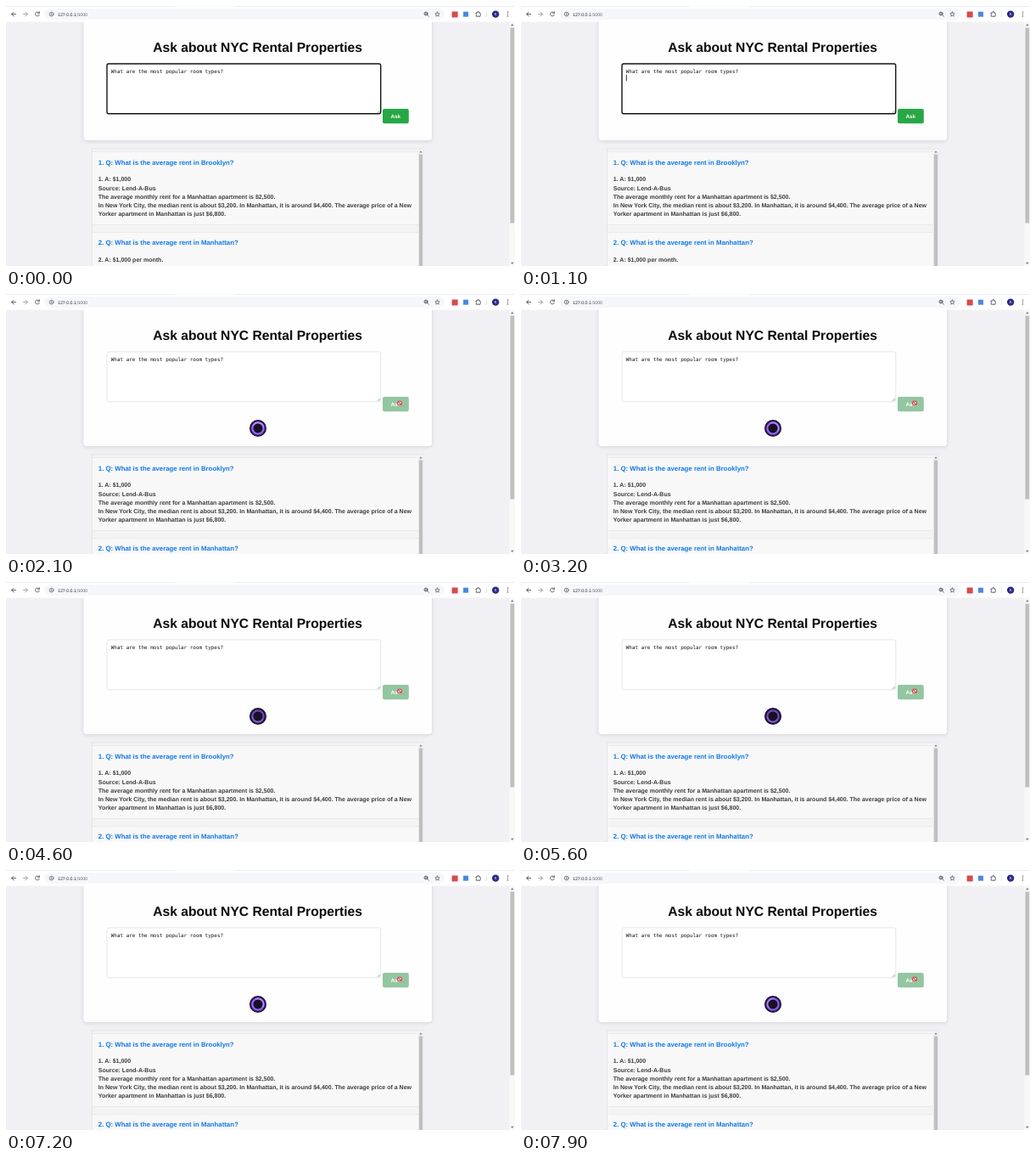
An HTML page that plays this animation: 600x306 px, repeating every 8 s.

```html
<!DOCTYPE html>
<html lang="en">
<head>
<meta charset="utf-8">
<title>Rental questions</title>
<style>
  html, body { margin: 0; width: 100%; height: 100%; overflow: hidden; background: #f1f0f5; }
  svg { display: block; width: 600px; height: 306px; }
  text { font-family: "Liberation Sans", Arial, sans-serif; text-rendering: geometricPrecision; white-space: pre; }
  .title { font-size: 15.65px; font-weight: 700; fill: #0a0a0a; text-anchor: middle; }
  .question { font-size: 7.82px; font-weight: 700; fill: #0f78e6; }
  .answer { font-size: 7.02px; font-weight: 700; fill: #3c3c3c; }
  .typed { font-family: "DejaVu Sans Mono", monospace; font-size: 5.95px; fill: #111; }
  .ask { font-size: 6.3px; font-weight: 700; fill: #fff; text-anchor: middle; }
  .url { font-size: 5.25px; fill: #26282c; }
  .icon { fill: none; stroke: #4a4d52; stroke-width: .9; stroke-linecap: round; stroke-linejoin: round; }
  .card { fill: #fefefe; filter: drop-shadow(0 1px 2.5px rgba(0, 0, 0, .12)); }
</style>
</head>
<body>
<svg viewBox="0 0 600 306">
  <rect width="600" height="306" fill="#f1f0f5"/>

  <rect id="card" class="card" x="91.5" y="14" width="410.5" height="144" rx="4"/>
  <text class="title" x="296.6" y="53.7">Ask about NYC Rental Properties</text>
  <rect id="field" x="119" y="68" width="322.7" height="58.8" rx="2" fill="#fff"/>
  <path d="M437.8 125.8L440.7 122.9M439.5 125.8L440.7 124.6" stroke="#777" stroke-width=".6"/>
  <text class="typed" x="123.8" y="78.8">What are the most popular room types?</text>
  <rect id="caret" width=".9" height="7.4" fill="#111"/>
  <rect id="button" x="444" y="121" width="30.8" height="17.2" rx="2"/>
  <text class="ask" x="459.3" y="131.8">Ask</text>

  <g id="panel">
    <rect x="101.4" y="168" width="390.4" height="150" fill="#f4f4f5" stroke="#dedee2" stroke-width=".7"/>
    <g fill="#f8f8f9" stroke="#e4e4e7" stroke-width=".7">
      <rect x="101.7" y="171.5" width="384.6" height="86"/>
      <rect x="101.7" y="266.3" width="384.6" height="60"/>
    </g>
    <g id="answers"></g>
    <rect x="486.3" y="168.4" width="5.3" height="150" fill="#f3f3f3"/>
    <path d="M487.3 172.6L489 170.5L490.7 172.6Z" fill="#777"/>
    <rect x="486.8" y="174.5" width="4.3" height="140" fill="#bfbfc1"/>
  </g>

  <g id="spinner" transform="translate(297 158)" fill="none">
    <circle r="10" fill="#130a22"/>
    <circle id="glow" r="7" stroke="#5a35a8" stroke-width="3.6"/>
    <circle id="ring" r="6.6" stroke="#9a6ff0" stroke-width="1.8"/>
    <path id="arc" d="M-6.6 0A6.6 6.6 0 0 1 4.7 -4.7" stroke="#c3a8ff" stroke-width="1.4" stroke-linecap="round"/>
    <circle r="4.6" fill="#171126"/>
  </g>

  <rect x="593.4" y="19" width="6.6" height="287" fill="#f8f8f9"/>
  <path d="M595 23.3L596.8 21L598.6 23.3ZM595 301.7L596.8 304L598.6 301.7Z" fill="#777"/>
  <rect id="thumb" x="594.4" y="25.5" width="4.8" height="230" fill="#bfbfc2"/>

  <rect width="600" height="18.6" fill="#fff"/>
  <rect width="600" height=".8" fill="#dfe8f8"/>
  <rect x="198" width="71" height=".8" fill="#fff"/>
  <rect x="45.5" y="3" width="472" height="13" rx="6.5" fill="#f6f7fb"/>
  <g class="icon">
    <path d="M11.5 9.6H6.7M8.9 7.3L6.6 9.6L8.9 11.9"/>
    <path d="M20.5 9.6H25.3M23.1 7.3L25.4 9.6L23.1 11.9" stroke="#999"/>
    <path d="M39 8.2A2.4 2.4 0 1 0 39.2 10.4M39.3 6.8V8.4H37.7"/>
    <circle cx="53.6" cy="9.6" r="2.4" stroke-width=".7"/>
    <path d="M53.6 9.4V10.8M53.6 8.3V8.4" stroke-width=".7"/>
    <circle cx="495" cy="9" r="2"/>
    <path d="M496.5 10.5L498.2 12.2M494.2 9H495.8"/>
    <path d="M508.5 6.9L509.3 8.7L511.2 8.9L509.8 10.2L510.2 12.1L508.5 11.1L506.8 12.1L507.2 10.2L505.8 8.9L507.7 8.7Z" stroke-width=".7"/>
    <path d="M554.3 8H556V7.3A.8 .8 0 0 1 557.6 7.3V8H559V9.3A1 1 0 0 1 559 11.1V12.2H554.3V11A.9 .9 0 0 0 554.3 9.4Z"/>
  </g>
  <rect x="525.6" y="6.5" width="7" height="7" fill="#d84a4a"/>
  <rect x="539" y="6.7" width="6" height="6" fill="#4a88d8"/>
  <path d="M566.3 6V13" stroke="#d5dcec" stroke-width=".7"/>
  <circle cx="577.1" cy="9.6" r="4.2" fill="#2b2a85"/>
  <text x="577.1" y="11.2" font-size="4.4" fill="#fff" text-anchor="middle">K</text>
  <g fill="#45484d">
    <circle cx="591.5" cy="7.3" r=".7"/><circle cx="591.5" cy="9.6" r=".7"/><circle cx="591.5" cy="11.9" r=".7"/>
  </g>
  <text class="url" x="61" y="11.5">127.0.0.1<tspan fill="#62666c">:5000</tspan></text>

  <path id="pointer" d="M0 0V8L1.9 6.3L3.1 9L4.4 8.4L3.2 5.8H5.7Z" fill="#fff" stroke="#111" stroke-width=".6"/>
  <g id="blocked" transform="translate(464 128.4)" fill="#fff" stroke="#d63a45" stroke-width="1.1">
    <circle r="2.4"/><path d="M-1.6 -1.6L1.6 1.6"/>
  </g>
</svg>
<script>
  const LOOP = 8000, STEP = 100, SENT = 2000, SHIFT = 21;
  const $ = id => document.getElementById(id);
  const set = (id, attrs) => {
    for (const key in attrs) $(id).setAttribute(key, attrs[key]);
  };
  const show = (id, on) => { $(id).style.display = on ? "" : "none"; };

  function addText(style, y, words) {
    const el = document.createElementNS("http://www.w3.org/2000/svg", "text");
    el.setAttribute("class", style);
    el.setAttribute("x", 108.8);
    el.setAttribute("y", y);
    el.textContent = words;
    $("answers").append(el);
  }

  function addItem(y, question, lines) {
    addText("question", y, question);
    lines.forEach((line, i) => addText("answer", y + 19.5 + i * 10.22, line));
  }

  addItem(186.9, "1. Q: What is the average rent in Brooklyn?", [
    "1. A: $1,000",
    "Source: Lend-A-Bus",
    "The average monthly rent for a Manhattan apartment is $2,500.",
    "In New York City, the median rent is about $3,200. In Manhattan, it is around $4,400. The average price of a New",
    "Yorker apartment in Manhattan is just $6,800."
  ]);
  addItem(281.3, "2. Q: What is the average rent in Manhattan?", [
    "2. A: $1,000 per month.",
    "Source: Lend-A-Bus"
  ]);

  // Caret: [from, to, x, y]
  const carets = [
    [400, 700, 256.2, 73.4],
    [700, 1200, 123.8, 80.8],
    [1700, 2000, 123.8, 80.8]
  ];

  function drawPage(sent) {
    set("card", { height: sent ? 144 + SHIFT : 144 });
    set("panel", { transform: `translate(0 ${sent ? SHIFT : 0})` });
    set("thumb", { height: sent ? 216 : 230 });
    set("field", { stroke: sent ? "#dcdce0" : "#151515", "stroke-width": sent ? .7 : 1.4 });
    set("button", { fill: sent ? "#92c6a0" : "#28a745" });
    show("spinner", sent);
    show("blocked", sent);
  }

  function drawCaret(t) {
    const c = carets.find(([from, to]) => t >= from && t < to);
    show("caret", c);
    if (c) set("caret", { x: c[2], y: c[3] });
  }

  function drawPointer(t) {
    show("pointer", t >= 1200 && t < SENT);
    const p = Math.max(0, Math.min(1, (t - 1200) / 600));
    const k = p * p * (3 - 2 * p);
    set("pointer", { transform: `translate(${590 - 127 * k} ${2 + 124 * k})` });
  }

  function drawSpinner(t) {
    const turn = (t - SENT) / 1000;
    const pulse = .5 + .5 * Math.cos((turn - .1) * Math.PI * 2);
    set("glow", { opacity: .45 + .3 * pulse });
    set("ring", { opacity: .6 + .4 * pulse });
    set("arc", { transform: `rotate(${turn * 360})`, opacity: .3 + .4 * pulse });
  }

  function draw(now) {
    const t = Math.floor((now % LOOP) / STEP) * STEP;
    drawPage(t >= SENT);
    drawCaret(t);
    drawPointer(t);
    drawSpinner(t);
  }

  const start = performance.now();
  function tick() {
    draw(performance.now() - start);
    requestAnimationFrame(tick);
  }
  tick();
</script>
</body>
</html>
```
